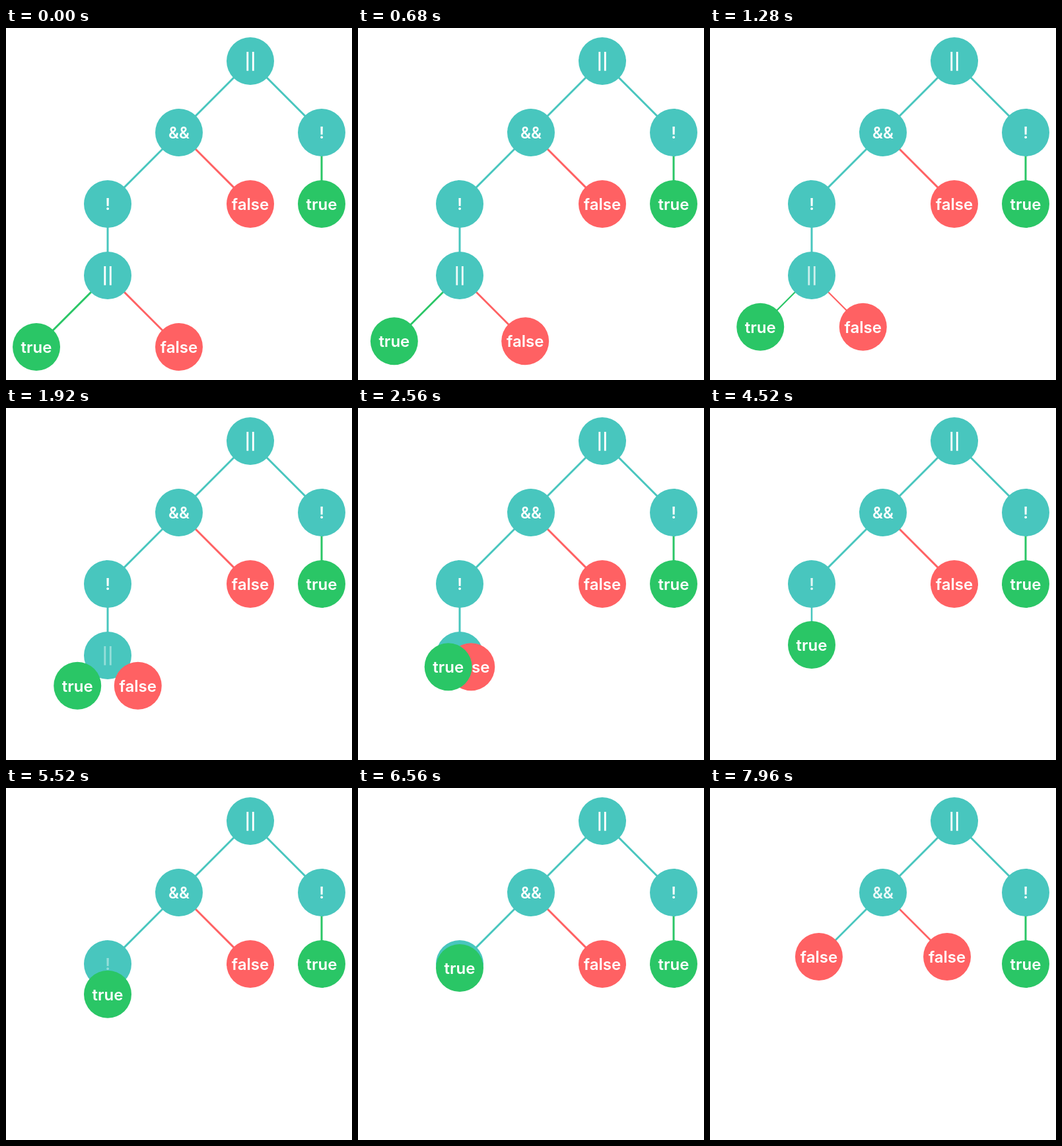
These frames come from a looping animation (524 by 532 pixels, 8000 ms). An HTML page:

```html
<!DOCTYPE html>
<html lang="en">
<head>
<meta charset="utf-8">
<title>Boolean expression tree</title>
<style>
  html, body { margin: 0; width: 100%; height: 100%; overflow: hidden; background: #fff; }
  svg { display: block; width: 524px; height: 532px; }
  text { font: 600 24px Inter, "Open Sans", sans-serif; fill: #fff; text-anchor: middle; }
</style>
</head>
<body>
<svg id="stage" viewBox="0 0 524 532"><g id="edges"></g><g id="nodes"></g></svg>
<script>
const LOOP = 8000, STEP = 3600, LEAD = 40;
const TEAL = '#48c6be', GREEN = '#2ac666', RED = '#ff6163';
const COLORS = { true: GREEN, false: RED };

// Listed from bottom to top of the stack; each node folds into its parent in its step.
const nodes = {
  or:     { label: '||',    x: 370, y: 50 },
  and:    { label: '&&',    x: 262, y: 158, parent: 'or' },
  not:    { label: '!',     x: 154, y: 266, parent: 'and', step: 2, result: 'false', resolved: 2 },
  inner:  { label: '||',    x: 154, y: 374, parent: 'not', step: 1, result: 'true', resolved: 1 },
  innerF: { label: 'false', x: 262, y: 482, parent: 'inner', step: 0 },
  innerT: { label: 'true',  x: 46,  y: 482, parent: 'inner', step: 0 },
  andF:   { label: 'false', x: 370, y: 266, parent: 'and', step: 2 },
  right:  { label: '!',     x: 478, y: 158, parent: 'or' },
  rightT: { label: 'true',  x: 478, y: 266, parent: 'right' },
};

function make(tag, parent, attrs) {
  const el = document.createElementNS('http://www.w3.org/2000/svg', tag);
  set(el, attrs);
  return parent.appendChild(el);
}

function set(el, attrs) {
  for (const key in attrs) el.setAttribute(key, attrs[key]);
}

const colorOf = label => COLORS[label] || TEAL;

// cubic-bezier(.42, 0, .58, 1)
function easeInOut(x) {
  if (x <= 0 || x >= 1) return Math.min(1, Math.max(0, x));
  let lo = 0, hi = 1;
  for (let i = 0; i < 24; i++) {
    const t = (lo + hi) / 2, s = 1 - t;
    if (1.26 * s * s * t + 1.74 * s * t * t + t * t * t < x) lo = t; else hi = t;
  }
  return lo * lo * (3 - 2 * lo);
}

const edgeLayer = document.getElementById('edges');
const nodeLayer = document.getElementById('nodes');

for (const node of Object.values(nodes)) {
  node.up = nodes[node.parent];
  if (node.up) {
    node.up.foldStep = node.step;
    node.edge = make('line', edgeLayer, { x1: node.up.x, y1: node.up.y, stroke: colorOf(node.label) });
  }
  node.group = make('g', nodeLayer, {});
  node.disc = make('circle', node.group, { r: 36 });
  node.text = make('text', node.group, { y: 9 });
}

function draw(time) {
  const clock = (time % LOOP + LEAD) / STEP;
  const progress = step => step === undefined ? 0 : easeInOut(clock - step);

  for (const node of Object.values(nodes)) {
    const { up, x, y } = node;
    const p = progress(node.step);
    const done = clock >= node.resolved;
    const label = done ? node.result : node.label;
    const cx = up ? x + (up.x - x) * p : x;
    const cy = up ? y + (up.y - y) * p : y;

    set(node.group, {
      transform: `translate(${cx} ${cy})`,
      visibility: clock >= node.step + 1 ? 'hidden' : 'visible',
    });
    set(node.disc, { fill: colorOf(label) });
    set(node.text, { opacity: done ? 1 : 1 - progress(node.foldStep) });
    if (node.text.textContent !== label) node.text.textContent = label;
    if (up) set(node.edge, { x2: cx, y2: cy, 'stroke-width': 3 * (1 - p) });
  }
}

let start;
function tick(now) {
  start ??= now;
  draw(now - start);
  requestAnimationFrame(tick);
}
draw(0);
requestAnimationFrame(tick);
</script>
</body>
</html>
```
